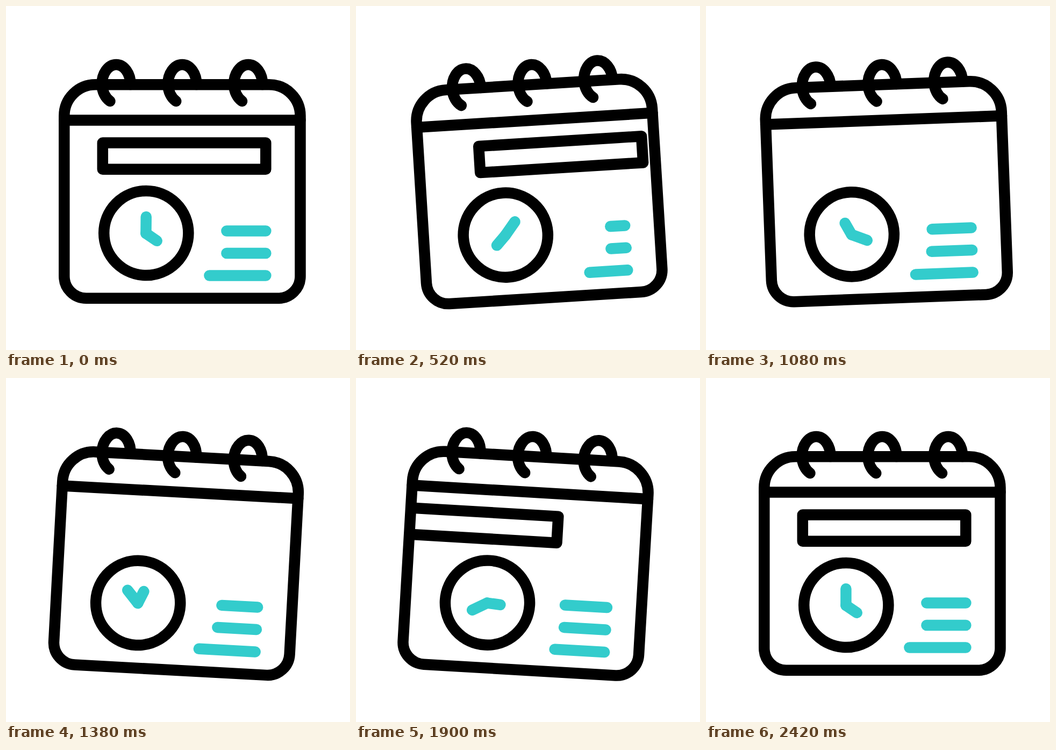
An HTML page for the animation above (2.62 s loop, 640 by 640 pixels).

```html
<!DOCTYPE html>
<html lang="en">
<head>
<meta charset="utf-8">
<title>Calendar</title>
<style>
  html, body { margin: 0; height: 100%; overflow: hidden; background: #fff; }
  svg { display: block; width: 100vw; height: 100vh; }
  g { fill: none; stroke: #000; stroke-width: 20.5; stroke-linecap: round; stroke-linejoin: round; }
  .accent { stroke: #3cc; }
</style>
</head>
<body>
<svg viewBox="0 0 640 640">
  <defs>
    <path id="ring" d="M193.5 177A26.6 37 0 0 1 178.4 146A26.6 37 0 0 1 231.6 146"/>
    <path id="frame" d="M166.3 146.2H489.5A58 58 0 0 1 547.5 204.2V502.8A41 41 0 0 1 506.5 543.8H149.3A41 41 0 0 1 108.3 502.8V204.2A58 58 0 0 1 166.3 146.2Z"/>
    <clipPath id="inside"><use href="#frame"/></clipPath>
  </defs>
  <g id="calendar">
    <g clip-path="url(#inside)">
      <rect id="banner" x="179.8" y="254.6" width="303.5" height="49.2"/>
    </g>
    <use href="#frame"/>
    <path d="M108.3 212.5H547.5"/>
    <use href="#ring"/>
    <use href="#ring" x="122.8"/>
    <use href="#ring" x="245.6"/>
    <circle cx="260.8" cy="422.5" r="78.6"/>
    <g class="accent">
      <path id="minute" d="M260.4 423V392.2"/>
      <path id="hour" d="M260.4 423L280.7 436.8"/>
      <path class="row"/>
      <path class="row"/>
      <path class="row"/>
    </g>
  </g>
</svg>
<script>
const LOOP = 2620, ACTIVE = 2400, ROW_CYCLE = 1200;
const $ = id => document.getElementById(id);

// Keys are [ms, value] pairs, eased in and out between neighbours.
function track(keys, t) {
  if (t <= keys[0][0]) return keys[0][1];
  for (let i = 1; i < keys.length; i++) {
    const [t0, a] = keys[i - 1], [t1, b] = keys[i];
    if (t < t1) {
      const x = (t - t0) / (t1 - t0);
      return a + (b - a) * x * x * (3 - 2 * x);
    }
  }
  return keys[keys.length - 1][1];
}

function bezier(x1, y1, x2, y2, x) {
  const at = (p, q, s) => 3 * s * (1 - s) ** 2 * p + 3 * s * s * (1 - s) * q + s ** 3;
  let lo = 0, hi = 1;
  for (let i = 0; i < 24; i++) {
    const mid = (lo + hi) / 2;
    if (at(x1, x2, mid) < x) lo = mid; else hi = mid;
  }
  return at(y1, y2, hi);
}

const swing = [[0, 0], [800, -4.9], [1600, 4.9], [2400, 0]];
const slideOut = [[400, 0], [1000, 390]];
const slideIn = [[1500, -390], [2100, 0]];
const rows = [
  { y: 418.5, length: [[130, 73], [400, 8], [780, 87], [1040, 73]] },
  { y: 460, length: [[170, 73], [425, 16], [790, 88.5], [1180, 73]] },
  { y: 501.6, length: [[190, 105], [450, 68], [900, 110], [1200, 105]] }
];
const rowPaths = document.querySelectorAll('.row');

const rotate = (id, angle, x, y) =>
  $(id).setAttribute('transform', `rotate(${angle} ${x} ${y})`);

function draw() {
  const t = Math.min(performance.now() % LOOP, ACTIVE);
  rotate('calendar', track(swing, t), 328, 141);

  const turn = 360 * bezier(.167, .167, .667, 1, t / ACTIVE);
  rotate('minute', turn * 4, 260.4, 423);
  rotate('hour', turn, 260.4, 423);

  const shift = track(t < 1250 ? slideOut : slideIn, t);
  $('banner').setAttribute('transform', `translate(${shift})`);

  rows.forEach(({ y, length }, i) =>
    rowPaths[i].setAttribute('d', `M483.4 ${y}h${-track(length, t % ROW_CYCLE)}`));
  requestAnimationFrame(draw);
}
draw();
</script>
</body>
</html>
```
